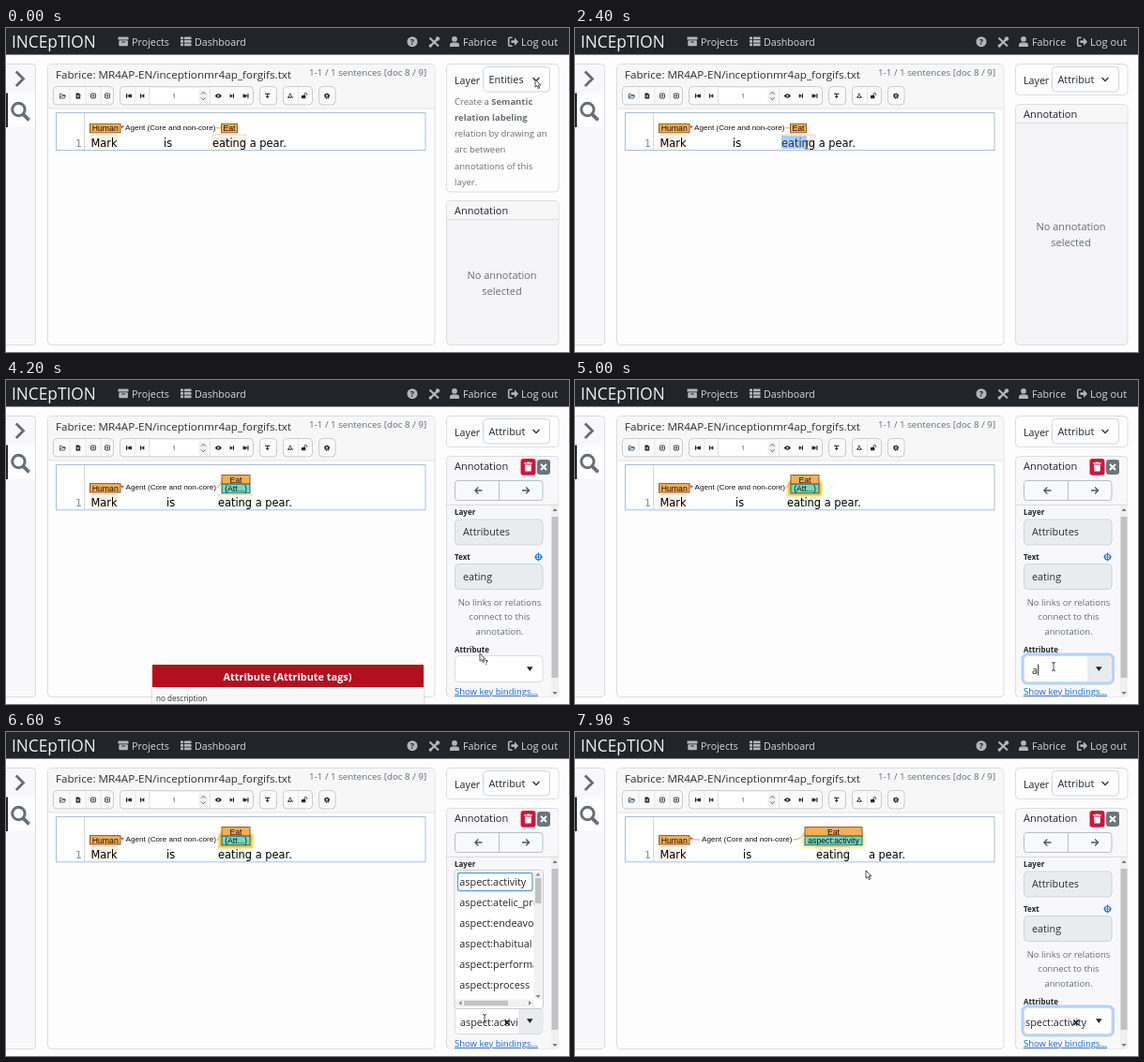
An HTML page for the animation above (8000 ms loop, 600 px wide and 346 px high).

```html
<!DOCTYPE html>
<html lang="en">
<head>
<meta charset="utf-8">
<title>Annotation editor</title>
<style>
  html, body { margin: 0; width: 100%; height: 100%; overflow: hidden; background: #fdfdfe; }
  svg { display: block; }
  text { font-family: "Open Sans", "Noto Sans", sans-serif; white-space: pre; }
  .doc { font-family: "DejaVu Sans", sans-serif; }
  .tag { font-family: "Liberation Sans", Arial, sans-serif; }
  .b { font-weight: 700; }
  .mid { text-anchor: middle; }
  .end { text-anchor: end; }
  .link { text-decoration: underline; }
</style>
</head>
<body>
<svg id="stage" width="600" height="346" viewBox="0 0 600 346">
  <defs>
    <filter id="blur" x="-30%" y="-60%" width="160%" height="220%"><feGaussianBlur stdDeviation="1.6"/></filter>
    <clipPath id="inField"><rect x="479" y="295" width="66.5" height="27"/></clipPath>
    <clipPath id="inList"><rect x="479" y="148" width="83.5" height="137"/></clipPath>
    <clipPath id="inCard"><rect x="469" y="81" width="120" height="257.5"/></clipPath>
  </defs>
</svg>
<script>
const LOOP = 8000, STEP = 100;
const stage = document.getElementById('stage');
const INK = '#212529', GREY = '#666e76', NAV = '#b3b6b9', NAV_TEXT = '#d6d8da', LINE = '#dcdde0', SOFT = '#f5f5f7';

// markup helpers
const text = (x, y, size, str, fill = INK, cls = '') =>
  `<text x="${x}" y="${y}" font-size="${size}" fill="${fill}" class="${cls}">${str}</text>`;
const box = (x, y, w, h, fill, stroke = 'none', r = 0, sw = 1) =>
  `<rect x="${x}" y="${y}" width="${w}" height="${h}" rx="${r}" fill="${fill}" stroke="${stroke}" stroke-width="${sw}"/>`;
const line = (d, stroke, sw = 1, extra = '') =>
  `<path d="${d}" fill="none" stroke="${stroke}" stroke-width="${sw}" ${extra}/>`;
const shape = (d, fill) => `<path d="${d}" fill="${fill}"/>`;
const dot = (x, y, r, fill, stroke = 'none', sw = 1, extra = '') =>
  `<circle cx="${x}" cy="${y}" r="${r}" fill="${fill}" stroke="${stroke}" stroke-width="${sw}" ${extra}/>`;

function layer(markup, attrs = {}) {
  const g = document.createElementNS('http://www.w3.org/2000/svg', 'g');
  g.innerHTML = markup;
  for (const k in attrs) g.setAttribute(k, attrs[k]);
  stage.appendChild(g);
  return g;
}

function navbar() {
  let s = box(0, 0, 600, 28.5, INK) + text(6, 20.8, 17.3, 'INCEpTION', '#f1f2f3');
  s += box(119.5, 9.5, 11, 3, NAV, 'none', .6) + box(120.3, 13.3, 9.6, 6, NAV, 'none', .8);
  s += line('M123.3 15h3.6', INK);
  for (let i = 0; i < 3; i++)
    s += box(186, 9.5 + i * 3.5, 3, 2.7, NAV) + box(190, 9.5 + i * 3.5, 7.5, 2.7, NAV);
  s += text(134, 18.8, 10.75, 'Projects', NAV_TEXT) + text(201, 18.8, 10.65, 'Dashboard', NAV_TEXT);
  s += dot(433, 14.7, 5.5, NAV) + text(433, 18, 9, '?', INK, 'b mid');
  s += line('M451.5 10.5L461 19.5', NAV, 2.2) + line('M452 19.5L460.5 11', NAV, 2.4);
  s += dot(460, 11.5, 2.2, NAV) + dot(452.3, 19, 1.7, NAV);
  s += dot(478, 11.8, 2.9, NAV) + shape('M473 20v-1.4q0-3 3-3h4q3 0 3 3V20z', NAV);
  s += text(487, 18.8, 10.7, 'Fabrice', NAV_TEXT);
  s += line('M539.5 10.3h-2.6q-1.2 0-1.2 1.2v6.4q0 1.2 1.2 1.2h2.6', NAV, 1.6);
  s += shape('M538.5 13.3h3.5v-3l4 4.4l-4 4.4v-3h-3.5z', NAV);
  return s + text(549, 18.8, 11.2, 'Log out', NAV_TEXT);
}

function sidebar() {
  return box(-4, 38.5, 35.5, 300, '#f8f7fa', LINE, 3) +
    line('M10.8 46.5l7.7 7.8l-7.7 7.8', GREY, 2.8) +
    box(0, 69.5, 31, 36, '#fdfdfe') + box(0, 69.5, 2, 36.5, INK) +
    dot(13.4, 87, 6.7, 'none', GREY, 3) + line('M18 91.8l6.6 6.6', GREY, 3.8);
}

function toolbar() {
  const D = '#222';
  const groups = [[50.5, 64], [121.5, 142], [270.5, 18], [295.5, 31], [333.5, 17.5]];
  let s = groups.map(([x, w]) => box(x, 62.5, w, 19.5, '#fafafa', '#c9cbce', 4)).join('');
  s += line('M68 63v18.5M85 63v18.5M101 63v18.5M138 63v18.5M311.5 63v18.5', '#e6e7e9');
  s += box(152.5, 63, 65, 18.5, '#fff', '#e0e1e3', 2);
  s += line('M57.4 75v-4.6h2l.8 1h2.6v1M57.4 75l1.3-2.4h4.8l-1.3 2.4z', '#1c4468', .8);
  s += shape('M74.6 69.6h3l1.6 1.6v4.2h-4.6z', D) + line('M76.9 71.3v3M75.5 72.8h2.8', '#fff', .7);
  for (const x of [93, 108])
    s += box(x - 2.4, 70.1, 4.8, 4.8, '#fff', D, .6, .9) + line(`M${x} 71.3v2.4M${x - 1.2} 72.5h2.4`, D, .8);
  const left = x => shape(`M${x + 2.3} 70.2v4.6l-3-2.3z`, D) + box(x - 2, 70.2, 1.2, 4.6, D);
  const right = x => shape(`M${x - 2.3} 70.2v4.6l3-2.3z`, D) + box(x + .8, 70.2, 1.2, 4.6, D);
  s += left(130) + shape('M134 70.2v4.6l-3-2.3z', D) + left(145);
  s += text(179, 75, 6.2, '1', INK, 'mid');
  s += box(205.5, 66, 9.5, 13, '#f1f1f2') + line('M208 70.7l2.3-2.4l2.3 2.4M208 74.3l2.3 2.4l2.3-2.4', '#555', .9);
  s += shape('M222.6 72.5q3.7-4.6 7.4 0q-3.7 4.6-7.4 0', D) + dot(226.3, 72.5, 1, '#fff');
  s += right(241) + right(256.5) + shape('M252.5 70.2v4.6l3-2.3z', D);
  s += line('M276 70.2h5.4M278.7 70.5v4.6M277 73.3h3.4', D, 1.1);
  s += line('M300.8 74.3l2-3.8l2.2 3.8z', D, 1.1, 'stroke-dasharray="2.4 .8"');
  s += box(315, 72, 4.3, 3.2, D) + line('M318 72v-1.2q.1-1.3 1.4-1.3t1.3 1.3v1', D, .9);
  return s + dot(342, 72.5, 1.7, 'none', D, 1.3) + dot(342, 72.5, 2.6, 'none', D, 1.1, 'stroke-dasharray="1 1.04"');
}

function mainPanel() {
  return box(44.5, 38.5, 412.5, 300, '#fdfdfe', LINE, 4) +
    shape('M45 86V42q0-3 3-3h405.5q3 0 3 3v44z', '#f7f7f8') + line('M45 86h412', '#e4e5e8') +
    text(53, 53.5, 11.65, 'Fabrice: MR4AP-EN/inceptionmr4ap_forgifs.txt', '#2b2f33') +
    text(323, 51.3, 9.8, '1-1 / 1 sentences [doc 8 / 9]', GREY) + toolbar();
}

// one annotated sentence; "attr" adds the second label under "Eat"
function sentence({ y, is, eat, rest, spanX, spanW, agent, attr }) {
  const top = y - 24.7, mid = top + 4.5, ORANGE = '#f4ae55', EDGE = '#8d6126', TAN = '#e3b27c';
  const mark = (x, w, fill) => box(x, y - 11, w, 13, fill) +
    line(`M${x} ${y - 11.3}q0-1.7 3.5-1.7h${w - 7}q3.5 0 3.5 1.7`, TAN, .7);
  const label = (x, w, ty, str, fill, edge) => box(x, ty, w, 9.5, fill, edge) +
    text(x + w / 2, ty + 8, 8.7, str, '#111', 'tag mid');
  const word = (x, str) => text(x, y, 11.4, str, '#000', 'doc');
  let s = box(53.5, 90.5, 393.5, y - 87, '#fff', '#a9bdea') + line(`M83.5 91V${y + 3}`, '#d3d4d8');
  s += text(81, y, 11, '1', '#888', 'doc end');
  s += mark(90.5, 28, '#fdf3e6') + mark(eat - .5, 37, attr ? '#f0f8ee' : '#fdf3e6');
  s += word(90.5, 'Mark') + word(is, 'is');
  s += rest ? word(eat, 'eating') + word(rest, 'a pear.') : word(eat, 'eating a pear.');
  s += label(89.5, 32.5, top, 'Human', ORANGE, EDGE);
  s += line(`M124 ${mid - 1}q2 1 ${agent - 126} 1`, '#e58a8a', .9);
  s += shape(`M122 ${mid - 2.5}l4 .3l-2.5 2.7z`, '#d9534f');
  s += line(`M${agent + 97} ${mid}Q${spanX - 3} ${mid} ${spanX} ${attr ? 106.5 : mid}`, '#d99a55', .9);
  s += text(agent, mid + 2.2, 8.12, 'Agent (Core and non-core)', '#111', 'tag');
  if (!attr) return s + label(spanX, spanW, top, 'Eat', ORANGE, EDGE);
  return s +
    `<g class="glow"><rect x="${spanX - 3}" y="108.5" width="${spanW + 6}" height="15" rx="2" fill="#f7b51f" filter="url(#blur)"/></g>` +
    label(spanX, spanW, 101.5, 'Eat', ORANGE, EDGE) + label(spanX, spanW, 111.2, attr, '#79d6c0', '#2f6f62');
}

const card = (y, h) => box(469.5, y + .5, 119.5, h, SOFT, LINE, 4) +
  shape(`M470 ${y + 20}V${y + 4}q0-3 3-3h112.5q3 0 3 3V${y + 20}z`, '#f7f7f8') +
  line(`M470 ${y + 20.5}h119`, LINE) + text(478, y + 15.2, 11, 'Annotation');

const emptyCard = (y, ty) => card(y, 338 - y) +
  text(528.5, ty, 11, 'No annotation', GREY, 'mid') + text(528.5, ty + 17.2, 11, 'selected', GREY, 'mid');

function description() {
  const rows = ['Create a <tspan class="b">Semantic</tspan>', '<tspan class="b">relation labeling</tspan>',
    'relation by drawing an', 'arc between', 'annotations of this', 'layer.'];
  return box(469.5, 38.5, 119.5, 136.5, '#fdfdfe', LINE, 4) +
    rows.map((r, i) => text(478, 81.5 + i * 17.3, 9.5, r, GREY)).join('');
}

function detailCard() {
  const field = (y, str) => box(478.5, y, 93.5, 27, '#e9ecef', '#cfd4da', 4) + text(487, y + 17.3, 10.8, str, '#2b2f33');
  const note = ['No links or relations', 'connect to this', 'annotation.'];
  let s = box(469.5, 81.5, 119.5, 257, '#f8f8fa', LINE, 4) + text(478, 96, 11, 'Annotation');
  s += box(548.5, 84, 16, 17.8, '#d3143c', 'none', 3) + box(566, 85, 14, 16, '#6c757d', 'none', 3);
  s += shape('M553 90.5h7l-.5 7h-6zM552.3 88.3h2.7l.5-.8h2l.5.8h2.7v1.2h-8.4z', '#fff');
  s += line('M570 90l6 6M576 90l-6 6', '#fff', 1.9);
  s += box(478.5, 107.5, 93.5, 21, '#f8f9fa', '#b9bdc2', 3) + line('M525.5 107.5v21', '#b9bdc2');
  s += line('M507.5 118h-7.5m3.4-3.5l-3.5 3.5l3.5 3.5M550 118h7.5m-3.4-3.5l3.5 3.5l-3.5 3.5', '#555', 1.3);
  s += line('M470 133.5h119', LINE);
  s += box(581, 134, 8, 204, '#f0f0f1') + box(581.5, 146, 7, 172, '#c1c2c4');
  s += shape('M582.5 140l2.5-3l2.5 3zM582.5 333l2.5 3l2.5-3z', '#777');
  s += text(478, 144, 8, 'Layer', INK, 'b') + field(149, 'Attributes');
  s += text(478, 192, 8, 'Text', INK, 'b') + field(196.5, 'eating');
  s += dot(567.5, 189, 3, 'none', '#1b74e8', 1.2) + line('M567.5 184.5v9M563 189h9', '#1b74e8', .9);
  s += note.map((r, i) => text(526, 240.7 + i * 15.5, 9.5, r, GREY, 'mid')).join('');
  s += text(478, 290.5, 8, 'Attribute', INK, 'b');
  return s + text(478, 335.8, 9.5, 'Show key bindings...', '#1a66d2', 'link');
}

function optionList() {
  const kinds = ['activity', 'atelic_process', 'endeavour', 'habitual', 'performance', 'process'];
  return box(478, 147.5, 94.5, 148, '#fff', '#c9ccd0', 3) +
    `<g clip-path="url(#inList)">${kinds.map((k, i) => text(483.3, 164 + i * 21.9, 10.85, 'aspect:' + k)).join('')}</g>` +
    box(562.5, 149, 9, 136, '#f1f1f2') + box(564, 156, 6.5, 27, '#c1c2c4') +
    shape('M564.5 153.5l2.5-3l2.5 3zM564.5 281l2.5 3l2.5-3z', '#888') +
    box(479, 285.5, 84, 8, '#f1f1f2') + box(488, 286.8, 47, 5.5, '#c1c2c4') +
    shape('M485.5 287l-3 2.5l3 2.5zM557 287l3 2.5l-3 2.5z', '#888');
}

function spokes() {
  let s = '';
  for (let i = 0; i < 12; i++) {
    const v = 225 - i * 14;
    s += line('M0-5.5V-10', `rgb(${v},${v},${v})`, 2.3, `stroke-linecap="round" transform="rotate(${i * 30})"`);
  }
  return s;
}

const pointer = '<path d="M0 0V8.2L1.9 6.5L3.3 9.6L4.7 9L3.3 6H5.8Z" fill="#fff" stroke="#222" stroke-width=".8"/>';

// scene, back to front
layer(box(0, 0, 600, 346, '#fdfdfe') + navbar() + sidebar() + mainPanel());
const plain = layer(sentence({ y: 127, is: 168, eat: 220, spanX: 229.5, spanW: 17, agent: 127 }));
const pending = layer(sentence({ y: 135.3, is: 171, eat: 226, spanX: 230, spanW: 30, agent: 127.5, attr: '(Att...)' }));
const done = layer(sentence({ y: 135.3, is: 179, eat: 257, rest: 313, spanX: 245, spanW: 61, agent: 135, attr: 'aspect:activity' }));
const glows = [...stage.querySelectorAll('.glow')];
const marked = layer('<rect x="220" y="115" height="14" fill="#3390ff" opacity=".4"/>');
const intro = layer(description() + emptyCard(184, 267.5));
const compact = layer(box(469.5, 38.5, 119.5, 33, '#fdfdfe', LINE, 4));
const empty = layer(emptyCard(81, 216));
layer(text(478, 59.7, 10.7, 'Layer'));
const selectRing = layer(box(507, 40, 73.5, 29, 'none', '#a9cdfb', 5, 3));
layer(box(508.5, 41.5, 71, 26.5, '#fdfdfe', '#cfd4da', 4) + line('M561.5 53l3.5 3.5l3.5-3.5', '#343a40', 1.5));
const selectText = layer(text(514.5, 59.3, 10.85, '')).firstChild;
const popup = layer(box(508.5, 69.5, 80, 40, '#fff', '#777') + box(509, 70, 79, 20, '#1e78d7') +
  text(514, 84, 10.8, 'Attributes', '#fff') + text(514, 103.5, 10.8, 'Entities'));

const details = layer(detailCard(), { 'clip-path': 'url(#inCard)' });
const fieldRing = layer(box(477, 293, 96.5, 31, 'none', '#b3d2fb', 5, 3));
const field = layer(box(478.5, 294.5, 93.5, 28, '#fff', '#d9dce0', 4));
const fieldButton = layer(shape('M546 295h22.5q3 0 3 3v21q0 3-3 3H546z', '#e9ebed'));
const fieldArrow = layer(shape('M555 306.3h6.6l-3.3 4.8z', '#222'));
const typed = layer(text(0, 313.5, 10.85, ''), { 'clip-path': 'url(#inField)' }).firstChild;
const clear = layer(line('M531.5 307.5l5 5.5M536.5 307.5l-5 5.5', '#222', 1.6));
const caret = layer(line('M0 303.5v12', '#111', .9));
const list = layer(optionList());
const listFocus = layer(box(481.5, 150.5, 79.5, 19, 'none', '#5f9fe6', 2, 1.3));
const tip = layer('<rect x="156" y="306" width="289" height="60" fill="#000" opacity=".25" filter="url(#blur)"/>' +
  box(156, 304, 289, 60, '#f8f8f9') + box(156, 304, 289, 24, '#b3101f') +
  text(300, 321.3, 10.9, 'Attribute (Attribute tags)', '#fff', 'b mid') + text(160, 343, 8.1, 'no description', '#333'));
const spinner = layer(spokes());
const arrow = layer(pointer);
const help = layer(pointer + text(5.5, 11.5, 6.5, '?', '#222', 'b'));
const beam = layer(line('M-2-4.5q2 0 2 1.5v6q0 1.5-2 1.5M2-4.5q-2 0-2 1.5M2 4.5q-2 0-2-1.5', '#333', .9));

const path = [
  [0, 564, 55], [200, 564, 55], [600, 538, 79], [900, 538, 79], [1300, 276, 140], [1800, 221, 124],
  [2000, 221, 124], [2600, 256, 125], [3100, 256, 125], [3400, 279, 138], [3600, 279, 138],
  [4100, 505, 292], [4200, 505, 292], [4500, 510, 306], [7200, 510, 306], [7800, 310, 148], [8000, 310, 148]
];
const typing = [[0, ''], [4900, 'a'], [5300, 'as'], [5600, 'asp'], [6400, 'aspect:activity']];

const within = (t, ...spans) => spans.some(([a, b]) => t >= a && t < b);
const show = (el, on) => { el.style.display = on ? '' : 'none'; };
const move = (el, x, y, turn = 0) => el.setAttribute('transform', `translate(${x} ${y}) rotate(${turn})`);

function pointAt(t) {
  const i = path.findIndex(k => k[0] > t);
  const [t0, x0, y0] = path[i - 1], [t1, x1, y1] = path[i];
  const p = (t - t0) / (t1 - t0), e = p * p * (3 - 2 * p);
  return [x0 + (x1 - x0) * e, y0 + (y1 - y0) * e];
}

function draw(t) {
  const [x, y] = pointAt(t);
  const open = t >= 3600;

  show(plain, !open);
  show(pending, within(t, [3600, 7500]));
  show(done, t >= 7500);
  glows.forEach(g => g.setAttribute('opacity', t < 4400 ? 0 : t < 7500 ? 1 : .4));
  show(marked, within(t, [2000, 3200]));
  marked.firstChild.setAttribute('width', Math.max(0, Math.min(36, x - 220)));

  show(intro, t < 1000);
  show(compact, t >= 1000);
  show(empty, within(t, [1000, 3600]));
  show(selectRing, within(t, [200, 2000]));
  selectText.textContent = t < 800 ? 'Entities' : 'Attribut';
  show(popup, within(t, [300, 800]));

  [details, field, fieldArrow, typed].forEach(el => show(el, open));
  show(fieldRing, within(t, [4500, 6400], [6900, LOOP]));
  show(fieldButton, within(t, [4500, 6900]));
  const scrolled = t >= 6900;
  typed.textContent = typing.filter(k => k[0] <= t).pop()[1];
  typed.setAttribute('class', scrolled ? 'end' : '');
  typed.setAttribute('x', scrolled ? 545 : t < 6400 ? 487 : 484);
  show(caret, within(t, [4500, 6400]));
  move(caret, 487.7 + (open ? typed.getComputedTextLength() : 0), 0);
  show(clear, t >= 5800);
  show(list, within(t, [5800, 6900]));
  show(listFocus, within(t, [6400, 6900]));
  show(tip, within(t, [4100, 4500]));

  show(spinner, within(t, [800, 1100], [3300, 3600], [7300, 7500]));
  move(spinner, 582, 51, Math.floor(t / STEP) * 30);

  const isBeam = within(t, [1700, 3700], [4400, 7300]), isHelp = within(t, [4100, 4400]);
  show(beam, isBeam);
  show(help, isHelp);
  show(arrow, !isBeam && !isHelp);
  [beam, help, arrow].forEach(c => move(c, x, y));
}

const start = performance.now();
function tick() {
  const t = Math.max(0, performance.now() - start) % LOOP;
  draw(Math.floor(t / STEP) * STEP);
  requestAnimationFrame(tick);
}
tick();
</script>
</body>
</html>
```
